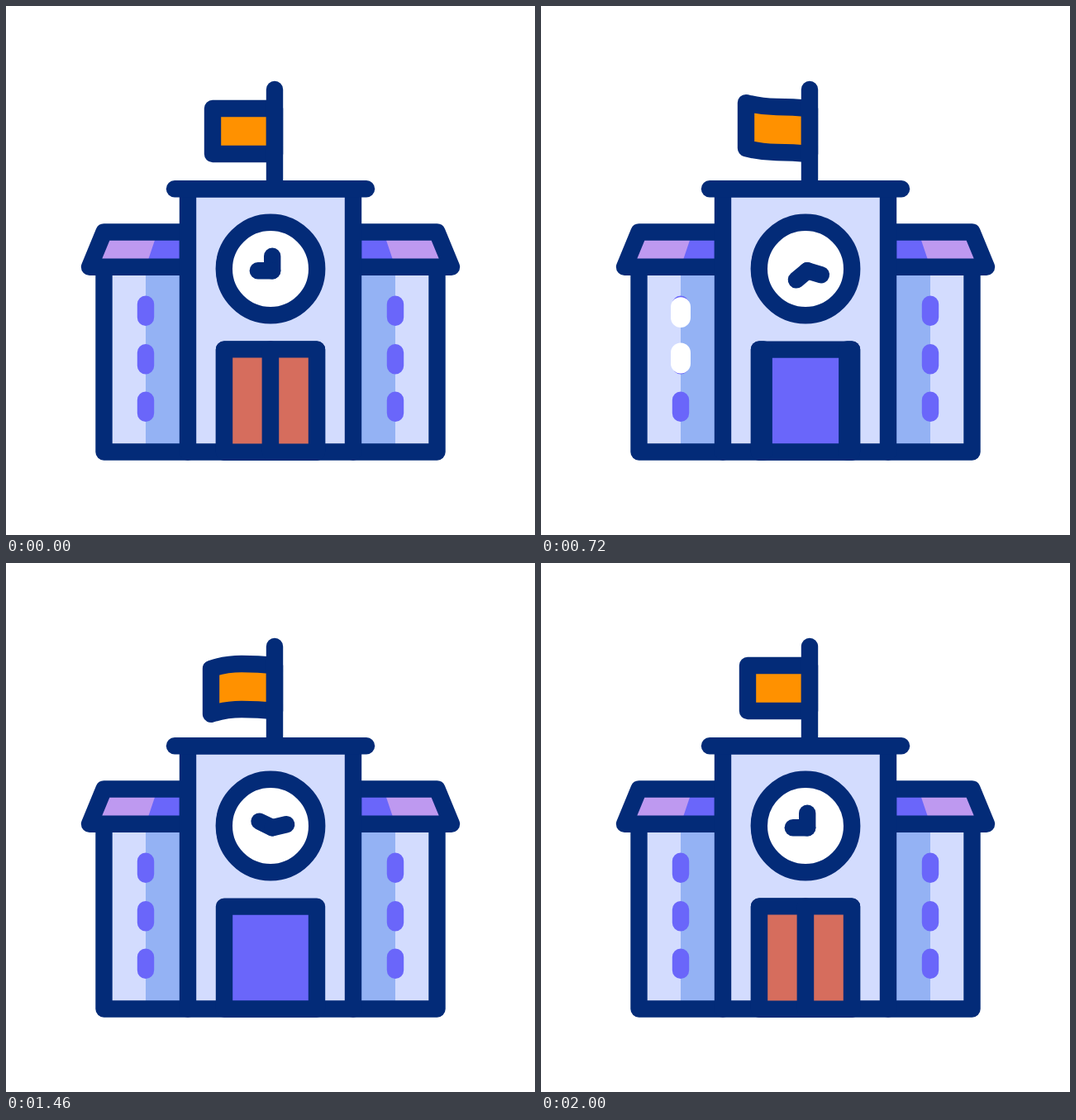
Write an HTML page that moves like this. It is 640x640 px and loops after 2.42 s.

```html
<!DOCTYPE html>
<html lang="en">
<head>
<meta charset="utf-8">
<title>School</title>
<style>
html, body { margin: 0; height: 100%; overflow: hidden; background: #fff; }
svg { display: block; width: 100vw; height: 100vh; }
.ink { stroke: #032b78; stroke-width: 20.4; stroke-linecap: round; stroke-linejoin: round; }
</style>
</head>
<body>
<svg viewBox="0 0 640 640" fill="none">
  <defs>
    <g id="wing">
      <path fill="#d3dcfe" d="M118.5 316H220V539.5H118.5z"/>
      <path fill="#94b2f4" d="M169 316H220V539.5H169z"/>
      <path fill="#be99f0" d="M118 273.5H220V316H101z"/>
      <path fill="#6a66fa" d="M183.5 273H220V316H169z"/>
      <path class="ink" d="M118.5 273.5H220V315.8H101zM118.5 316V539.5H220"/>
      <path stroke="#6a66fa" stroke-width="20.4" stroke-linecap="round" d="M169 360.8v16M169 419.2v16M169 476.8v16"/>
    </g>
  </defs>
  <use href="#wing"/>
  <use href="#wing" transform="matrix(-1 0 0 1 640 0)"/>
  <g id="shines" stroke="#fff" stroke-width="24" stroke-linecap="round"></g>
  <path id="flag" class="ink" fill="#ff9100"/>
  <path class="ink" d="M325 101V221"/>
  <path class="ink" fill="#d3dcfe" d="M220 221.3H420V539.5H220z"/>
  <path class="ink" d="M204 221.3H436"/>
  <circle class="ink" fill="#fff" cx="320" cy="318" r="56.2"/>
  <path id="hour" class="ink" d="M322.2 320.2V302.8"/>
  <path id="minute" class="ink" d="M322.2 320.2V302.8"/>
  <path class="ink" fill="#6a66fa" d="M264 539.5V415.6H376V539.5z"/>
  <g class="ink" fill="#d66d5d">
    <rect id="doorL" x="264" y="415.4" height="124.4"/>
    <rect id="doorR" y="415.4" height="124.4"/>
  </g>
</svg>
<script>
const LOOP = 2420;
const $ = id => document.getElementById(id);
const ramp = (t, from, length) => Math.min(1, Math.max(0, (t - from) / length));
const smooth = p => p * p * (3 - 2 * p);
const ease = (t, from, length) => smooth(ramp(t, from, length));

// Window glints: x, top, start time
const SWEEP = 170, HOLD = 16;
const glints = [
  [470.5, 361, 105], [470.5, 419.4, 250], [470.5, 477, 345],
  [169, 361, 485], [169, 419.4, 598], [169, 477, 784]
].map(([x, y, start]) => {
  const line = document.createElementNS("http://www.w3.org/2000/svg", "path");
  $("shines").append(line);
  return { line, x, y, start };
});

// Flag poses every 200 ms: outer edge x and y, middle y
const rest = [0, 0, 0];
const wave = [[0, -0.4, 6.1], [-1.5, 20.9, 5.7], [-2, 11.6, -2], [-2, -17.8, -2.1]];
const poses = [rest, ...wave, ...wave, rest];

function drawFlag(t) {
  const i = Math.min(8, Math.floor(t / 200));
  const p = ramp(t, i * 200, 200);
  const k = (p + smooth(p)) / 2;
  const [dx, edge, mid] = poses[i].map((v, j) => v + (poses[i + 1][j] - v) * k);
  const x = 250 + dx, top = 124 + mid, low = 179 + mid;
  $("flag").setAttribute("d",
    `M${x} ${124 + edge}Q266 ${top} 285 ${top}Q305 ${top} 325 124V179` +
    `Q305 ${low} 285 ${low}Q266 ${low} ${x} ${179 + edge}z`);
}

function drawGlint({ line, x, y, start }, t) {
  const head = ease(t, start, SWEEP), tail = ease(t, start + SWEEP + HOLD, SWEEP);
  const shown = head > 0 && tail < 1;
  line.setAttribute("d", shown ? `M${x} ${y + 16 * tail}V${y + 16 * head + 0.01}` : "");
}

function draw(t) {
  const turn = ease(t, 0, 2000);
  $("hour").setAttribute("transform", `rotate(${360 * turn} 322.2 320.2)`);
  $("minute").setAttribute("transform", `rotate(${270 + 1080 * turn} 322.2 320.2)`);

  const gap = 56 * (ease(t, 400, 400) - ease(t, 1600, 400));
  $("doorL").setAttribute("width", 56 - gap);
  $("doorR").setAttribute("width", 56 - gap);
  $("doorR").setAttribute("x", 320 + gap);

  drawFlag(t);
  glints.forEach(g => drawGlint(g, t));
}

const begin = performance.now();
function tick() {
  draw((performance.now() - begin) % LOOP);
  requestAnimationFrame(tick);
}
tick();
</script>
</body>
</html>
```
